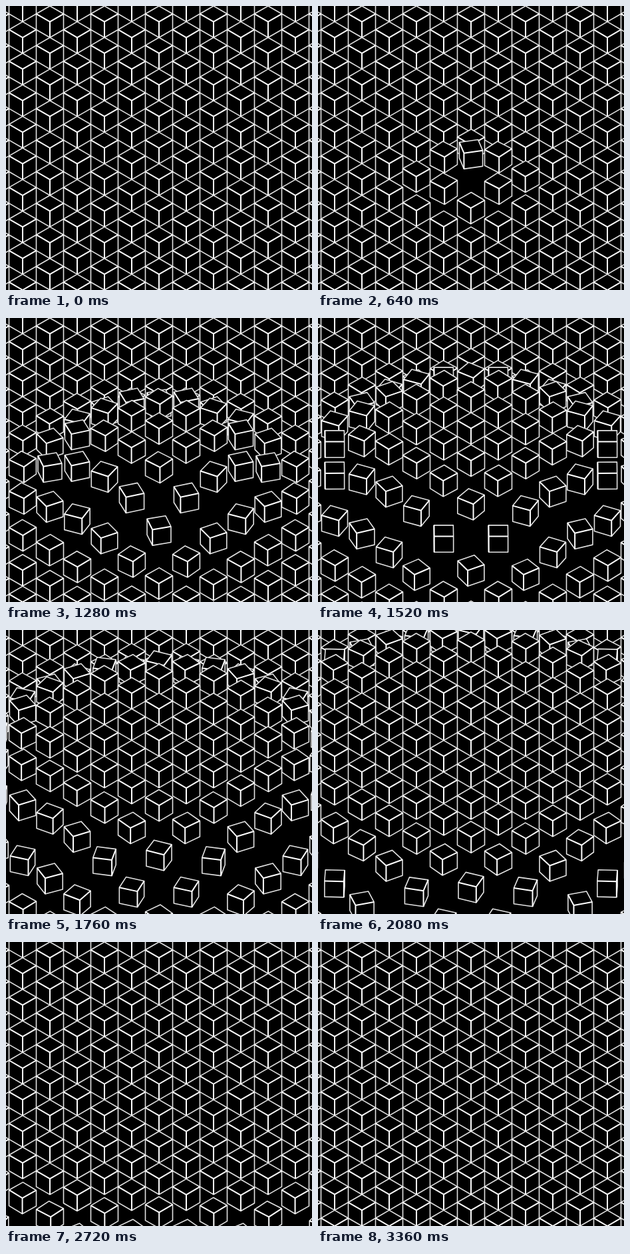
These frames come from a looping animation (460 by 426 pixels, 3600 ms). An HTML page with a canvas:

```html
<!DOCTYPE html>
<html lang="en">
<head>
<meta charset="utf-8">
<title>Rising cubes</title>
<style>
  html, body { margin: 0; width: 100%; height: 100%; overflow: hidden; background: #000; }
  canvas { display: block; }
</style>
</head>
<body>
<canvas id="stage" width="460" height="426"></canvas>
<script>
const ctx = document.getElementById('stage').getContext('2d');
const LOOP = 3600, RISE = 1380, DELAY = 230;   // ms; DELAY is per grid unit from the centre
const COLUMN = 41, EDGE = COLUMN / Math.sqrt(3);
const RADIUS = COLUMN / 2, SQUASH = 1 / Math.sqrt(3);
const CX = 230, CY = 213 + 2 * EDGE;

const clamp = x => Math.min(1, Math.max(0, x));
const ease = (x, power) => x < 0.5 ? (2 * x) ** power / 2 : 1 - (2 - 2 * x) ** power / 2;

function trace(points) {
  ctx.beginPath();
  for (const [x, y] of points) ctx.lineTo(x, y);
}

function stroke(width, color) {
  ctx.lineWidth = width;
  ctx.strokeStyle = color;
  ctx.stroke();
}

// Isometric cube centred on (x, y), turned about its vertical axis.
function drawCube(x, y, turn) {
  const corner = k => {
    const angle = turn + k * Math.PI / 2;
    return [x + RADIUS * Math.sin(angle), y - EDGE / 2 + RADIUS * SQUASH * Math.cos(angle)];
  };
  const below = ([px, py]) => [px, py + EDGE];
  const [front, right, back, left] = [0, 1, 2, 3].map(corner);

  trace([left, back, right, below(right), below(front), below(left)]);
  ctx.closePath();
  ctx.fillStyle = '#000';
  ctx.fill();
  stroke(1.6, '#e2e2e2');

  trace([left, front, right]);
  ctx.moveTo(...front);
  ctx.lineTo(...below(front));
  stroke(2, '#fff');
}

function draw(time) {
  ctx.fillStyle = '#000';
  ctx.fillRect(0, 0, 460, 426);
  ctx.lineJoin = 'round';
  for (let row = -14; row <= 16; row++) {
    const odd = Math.abs(row % 2);
    for (let col = -6 + odd; col <= 6; col += 2) {
      const distance = Math.hypot((row + col) / 2, (row - col) / 2);
      const progress = clamp((time - DELAY * distance) / RISE);
      const lift = 4 * EDGE * ease(progress, 3);
      // A quarter turn looks the same as none, so keep the nearest corner in front.
      const spin = ease(progress, 5);
      const quarter = spin > 0.5 ? spin - 1 : spin;
      const turn = (odd ? 1 : -1) * quarter * Math.PI / 2;
      drawCube(CX + col * COLUMN, CY + row * EDGE - lift, turn);
    }
  }
}

function tick() {
  draw(performance.now() % LOOP);
  requestAnimationFrame(tick);
}
tick();
</script>
</body>
</html>
```
